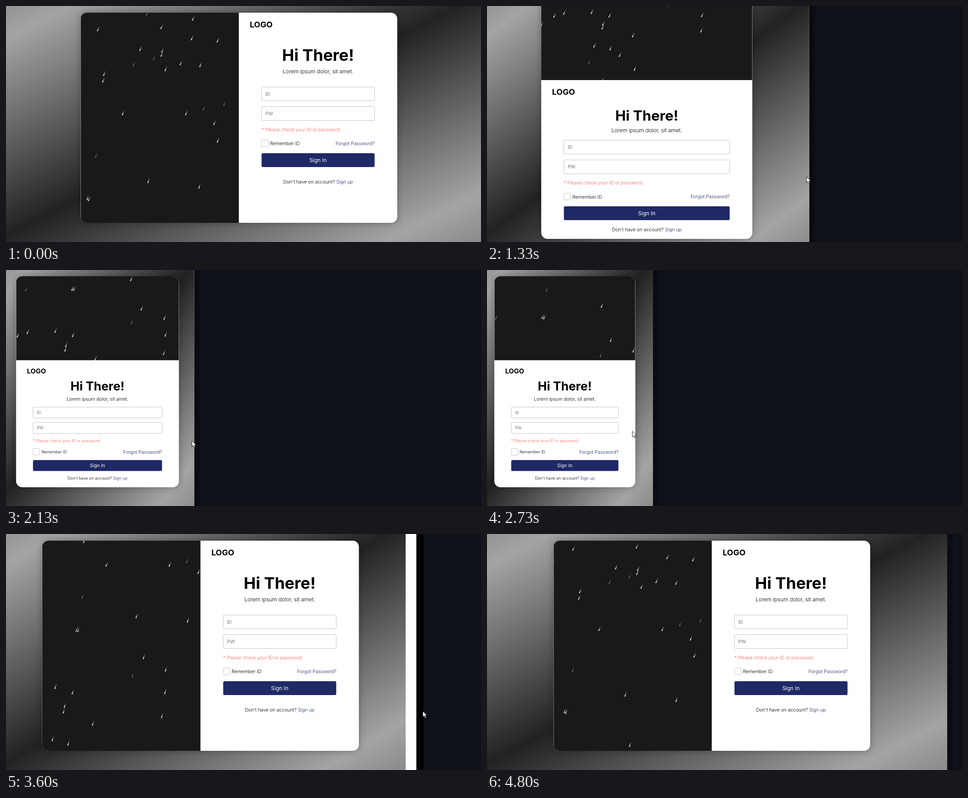
An HTML page for the animation above (4.87 s loop, 1059 by 529 pixels).

```html
<!DOCTYPE html>
<html lang="en">
<head>
<meta charset="utf-8">
<title>Responsive sign-in</title>
<style>
  html, body { margin: 0; width: 100%; height: 100%; overflow: hidden; background: #0e1119; }
  svg { display: block; }
  text { font-family: Inter, "Open Sans", sans-serif; font-weight: 300; fill: #000; }
  .bold { font-weight: 700; }
  .link { fill: #1e2966; }
  .hint { font-weight: 400; fill: #757575; }
  .field { fill: #fff; stroke: #c3c3c3; }
  #card { filter: drop-shadow(0 0 8px rgba(0, 0, 0, .3)); }
</style>
</head>
<body>
<svg id="stage" width="1059" height="529" viewBox="0 0 1059 529">
  <defs>
    <linearGradient id="metal" gradientUnits="userSpaceOnUse">
      <stop offset="0" stop-color="#8a8a8a"/>
      <stop offset=".1" stop-color="#a4a4a4"/>
      <stop offset=".5" stop-color="#222"/>
      <stop offset=".9" stop-color="#a4a4a4"/>
      <stop offset="1" stop-color="#8a8a8a"/>
    </linearGradient>
    <linearGradient id="streak" x2="0" y2="1">
      <stop offset="0" stop-color="#fff" stop-opacity=".1"/>
      <stop offset="1" stop-color="#fff"/>
    </linearGradient>
    <clipPath id="cardClip"><rect id="cardShape" rx="14"/></clipPath>
    <clipPath id="viewClip"><rect id="viewShape" height="529"/></clipPath>
  </defs>
  <rect width="1059" height="529" fill="#0e1119"/>
  <rect id="rim" width="12" height="529" fill="#0b0c13"/>
  <rect id="edge" height="529"/>
  <g clip-path="url(#viewClip)">
    <rect width="1080" height="529" fill="#fff"/>
    <g id="bar">
      <rect width="13" height="529" fill="#f8f8f8"/>
      <rect x="2" width="10" height="523.5" fill="#c1c1c1"/>
    </g>
    <rect id="page" height="529" fill="url(#metal)"/>
    <rect id="card" rx="14" fill="#fff"/>
    <g clip-path="url(#cardClip)">
      <svg id="panel" overflow="hidden">
        <rect width="100%" height="100%" fill="#191919"/>
        <g id="rain"></g>
      </svg>
    </g>
    <text id="logo" class="bold">LOGO</text>
    <text id="title" class="bold" text-anchor="middle">Hi There!</text>
    <text id="sub" text-anchor="middle">Lorem ipsum dolor, sit amet.</text>
    <rect id="idBox" class="field" rx="2.5"/>
    <text id="idHint" class="hint">ID</text>
    <rect id="pwBox" class="field" rx="2.5"/>
    <text id="pwHint" class="hint">PW</text>
    <text id="error" style="fill:#ff5f5f">* Please check your ID or password.</text>
    <rect id="check" class="field" width="15" height="15" rx="2"/>
    <text id="remember">Remember ID</text>
    <text id="forgot" class="link" text-anchor="end">Forgot Password?</text>
    <rect id="button" rx="3" fill="#1e2966"/>
    <text id="signIn" text-anchor="middle" style="fill:#fff;font-weight:400">Sign In</text>
    <text id="foot" text-anchor="middle">Don't have on account? <tspan class="link">Sign up</tspan></text>
  </g>
  <path id="cursor" d="M0 0V13L3 10.3L5.2 15.2L7.5 14.2L5.3 9.5H9.5Z" fill="#fff" stroke="#111" stroke-width=".9"/>
</svg>
<script>
const LOOP = 4870, FRAME = LOOP / 73, RAIN_LOOP = 5000;
const LEFT = -23.5, MID_Y = 250.5, PAGE_H = 554;
const $ = id => document.getElementById(id);
const set = (id, attrs) => { for (const k in attrs) $(id).setAttribute(k, attrs[k]); };

// [time, value, ...]: right edge of the laid-out page, of the window, and the pointer
const layoutKeys = [[0, 1062], [560, 1062], [930, 989], [1070, 881], [1600, 590], [1730, 533],
  [2130, 432], [2670, 371], [2800, 370], [3200, 655], [3270, 698], [3730, 965], [3900, 1026]];
const windowKeys = [[0, 1062], [530, 1062], [930, 940], [1070, 860], [1600, 576], [1730, 529],
  [2130, 420], [2670, 370], [2800, 370], [3200, 718], [3270, 745], [3730, 980], [3900, 1026]];
const pointerKeys = [[250, 1080, 386], [500, 1054, 383], [930, 933, 383], [1070, 853, 383],
  [1600, 571, 383], [1730, 525, 383], [2130, 415, 383], [2600, 362, 372], [2730, 320, 361],
  [2800, 375, 366], [3200, 748, 388], [3270, 784, 390], [3730, 985, 400], [3870, 1020, 404],
  [4070, 920, 404], [4330, 905, 470], [4460, 900, 545]];

// x where a drop enters, and when
const drops = [
  [50, 4621], [190, 4672], [255, 4869], [265, 4426], [324, 4379], [157, 4204], [207, 4169],
  [208, 4089], [256, 3925], [301, 3892], [226, 3816], [92, 3728], [94, 3608], [159, 3063],
  [300, 3063], [369, 2910], [388, 2645], [259, 2078], [376, 2005], [134, 1853], [138, 1842],
  [42, 900], [62, 965], [19, 705], [123, 985], [165, 908], [156, 725], [157, 650], [230, 490],
  [150, 291], [188, 235], [213, 116], [358, 1235], [371, 915], [379, 589], [301, 1420],
  [8, 643], [13, 4313], [10, 3907]];
const thinDrops = [[149, 4989], [193, 4020], [152, 3909], [336, 3142], [379, 3214],
  [126, 2430], [288, 1150], [31, 1837]];

const wide = {
  top: 15, h: 471, hint: 10.5, note: 10.5, field: 31, inset: 50.5,
  logo: [48, 18], title: [122.6, 36], sub: [150.5, 12], id: 181.5, pw: 225.5,
  error: 281, check: 300.5, remember: 312.3, forgot: 311.8, button: 330, sign: 12, foot: 398
};
const medium = {
  top: -21, h: 543, panel: 187, hint: 10.5, note: 10.5, field: 31, inset: 50.5,
  logo: [199.3, 18], title: [257, 31.5], sub: [282.6, 12], id: 301, pw: 345,
  error: 400.4, check: 419.5, remember: 431.5, forgot: 431, button: 449, sign: 12, foot: 505
};
const small = {
  top: 14, h: 473, panel: 188.5, hint: 9, note: 9, field: 24.5, inset: 37.7,
  logo: [232.3, 15], title: [269.5, 27], sub: [293, 10.5], id: 307.3, pw: 341.8,
  error: 386.3, check: 400, remember: 411.3, forgot: 411.7, button: 426, sign: 10.5, foot: 470.2
};

function at(keys, t, i = 1) {
  const n = keys.findIndex(k => k[0] > t);
  if (n < 0) return keys[keys.length - 1][i];
  if (n === 0) return keys[0][i];
  const a = keys[n - 1], b = keys[n];
  return a[i] + (b[i] - a[i]) * (t - a[0]) / (b[0] - a[0]);
}

function addDrop([x, birth], thin) {
  const el = document.createElementNS("http://www.w3.org/2000/svg", "path");
  el.setAttribute("d", "M-.25-6.5H.25L1.15 5A1.15 1.15 0 0 1-1.15 5Z");
  el.setAttribute("fill", "url(#streak)");
  if (thin) el.setAttribute("opacity", .75);
  $("rain").append(el);
  return { el, x, birth, girth: thin ? .55 : 1 };
}
const rain = [...drops.map(d => addDrop(d, false)), ...thinDrops.map(d => addDrop(d, true))];

function drawRain(t) {
  for (const d of rain) {
    const age = (t - d.birth + 60 + RAIN_LOOP) % RAIN_LOOP - 60;
    const y = .09 * age + 1.325e-5 * age * age;
    d.el.setAttribute("transform",
      `translate(${d.x - .285 * y} ${y}) rotate(${26 - y / 47}) scale(${d.girth} 1)`);
  }
}

const write = (id, x, y, size) => set(id, { x, y, "font-size": size });

function drawCard(mode, x, width) {
  const m = mode, isWide = m === wide;
  const box = { x, y: m.top, width, height: m.h };
  set("card", box);
  set("cardShape", box);
  set("panel", { x, y: m.top, width: isWide ? width / 2 : width, height: isWide ? m.h : m.panel });

  const left = isWide ? x + width / 2 : x, right = x + width;
  const mid = (left + right) / 2, inner = left + m.inset, end = right - m.inset;
  const field = y => ({ x: inner, y, width: end - inner, height: m.field });
  const hintY = y => y + m.field / 2 + m.hint * .365;
  write("logo", left + 24.2, ...m.logo);
  write("title", mid, ...m.title);
  write("sub", mid, ...m.sub);
  set("idBox", field(m.id));
  set("pwBox", field(m.pw));
  write("idHint", inner + 8.5, hintY(m.id), m.hint);
  write("pwHint", inner + 8.5, hintY(m.pw), m.hint);
  write("error", inner - .3, m.error, m.note);
  set("check", { x: inner, y: m.check });
  write("remember", inner + 18.8, m.remember, m.note);
  write("forgot", end + .3, m.forgot, 10.5);
  set("button", field(m.button));
  write("signIn", mid, m.button + m.field / 2 + m.sign * .355, m.sign);
  write("foot", mid, m.foot, m.note);
}

function draw(t) {
  const right = at(layoutKeys, t), edge = at(windowKeys, t);
  const W = right - LEFT, mid = (right + LEFT) / 2;
  const growing = t > 2800 && t < 3900, shrinking = t > 560 && t < 2100;

  const k = W * PAGE_H / (W * W + PAGE_H * PAGE_H), dx = PAGE_H * k, dy = W * k;
  set("metal", { x1: mid - dx, y1: MID_Y - dy, x2: mid + dx, y2: MID_Y + dy });
  set("page", { width: right });
  set("viewShape", { width: edge });
  set("rim", { x: edge });
  set("edge", { x: edge, width: growing ? 16 : shrinking ? 4 : 0 });

  const mode = W > 803 ? wide : W > 520 ? medium : small;
  const width = mode === wide ? 706 : mode === medium ? Math.min(470.6, W * .8185) : W * .798;
  set("bar", {
    transform: `translate(${right} 0)`,
    visibility: growing && mode === medium ? "visible" : "hidden"
  });
  drawCard(mode, mid - width / 2, width);
  drawRain(t);
  set("cursor", { transform: `translate(${at(pointerKeys, t)} ${at(pointerKeys, t, 2)})` });
}

const start = performance.now();
function tick() {
  const t = (performance.now() - start) % LOOP;
  draw(Math.floor((t + 5) / FRAME) % 73 * FRAME);
  requestAnimationFrame(tick);
}
tick();
</script>
</body>
</html>
```
